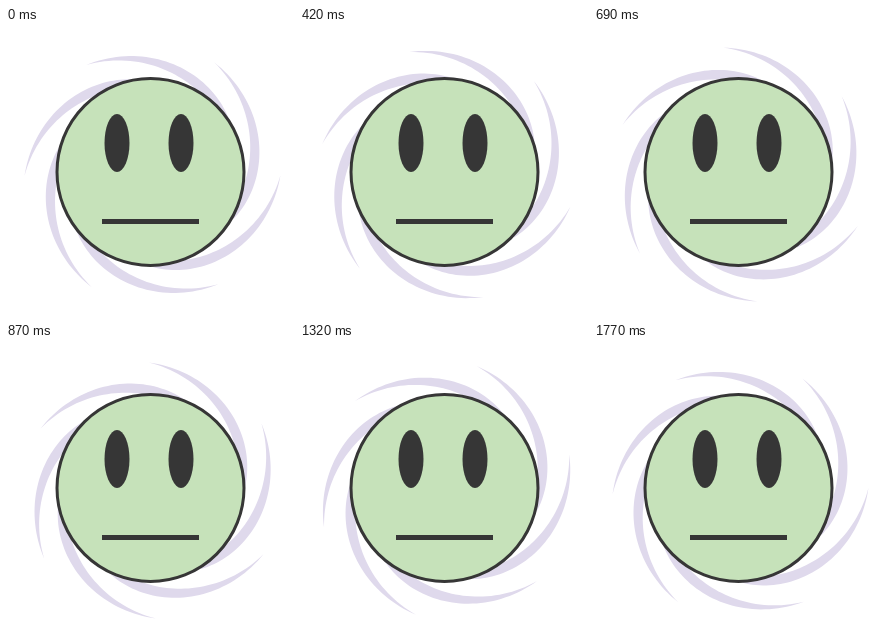
An HTML page with a canvas for the animation above (1.8 s loop, 288x288 px).

```html
<!DOCTYPE html>
<html lang="en">
<head>
<meta charset="utf-8">
<title>Neutral face with turning swirl</title>
<style>
html, body { margin: 0; width: 100%; height: 100%; overflow: hidden; background: #fff; }
canvas { display: block; width: 288px; height: 288px; }
</style>
</head>
<body>
<canvas id="stage" width="288" height="288"></canvas>
<script>
const ctx = document.getElementById('stage').getContext('2d');
const LOOP = 1800, STEP = 30, LAST = LOOP / STEP - 1;
const RAD = Math.PI / 180;
const HUB = 146.5;
const LILAC = '#dfd9ec', GREEN = '#c6e2ba', DARK = '#363636';
// Angle of each arm's tip, in degrees
const ARMS = [-61.2, 0.3, 59, 118.3, 179.4, 238.9];

const outer = d => 128 - 0.36 * d - 0.0004 * d * d;
const width = d => 10 * Math.sin(Math.PI / 2 * Math.min(1, d / 60));

function arm(tip) {
  const end = 90;
  const point = (d, r) => ctx.lineTo(
    HUB + r * Math.cos((tip + d) * RAD),
    HUB + r * Math.sin((tip + d) * RAD));
  ctx.beginPath();
  for (let d = 0; d <= end; d += 2) point(d, outer(d));
  for (let d = end; d >= 0; d -= 2) point(d, outer(d) - width(d));
  ctx.closePath();
  ctx.fill();
}

function eye(x) {
  ctx.beginPath();
  ctx.ellipse(x, 115, 12.5, 29, 0, 0, 2 * Math.PI);
  ctx.fill();
}

function face() {
  ctx.fillStyle = GREEN;
  ctx.strokeStyle = DARK;
  ctx.lineWidth = 3;
  ctx.beginPath();
  ctx.arc(144.5, 144, 93.5, 0, 2 * Math.PI);
  ctx.fill();
  ctx.stroke();
  ctx.fillStyle = DARK;
  eye(111);
  eye(175);
  ctx.fillRect(96, 191, 97, 5);
}

function draw(ms) {
  const turn = 60 * Math.floor((ms % LOOP) / STEP) / LAST;
  ctx.fillStyle = '#fff';
  ctx.fillRect(0, 0, 288, 288);
  ctx.fillStyle = LILAC;
  for (const tip of ARMS) arm(tip + turn);
  face();
}

const start = performance.now();
function tick() {
  draw(performance.now() - start);
  requestAnimationFrame(tick);
}
tick();
</script>
</body>
</html>
```
